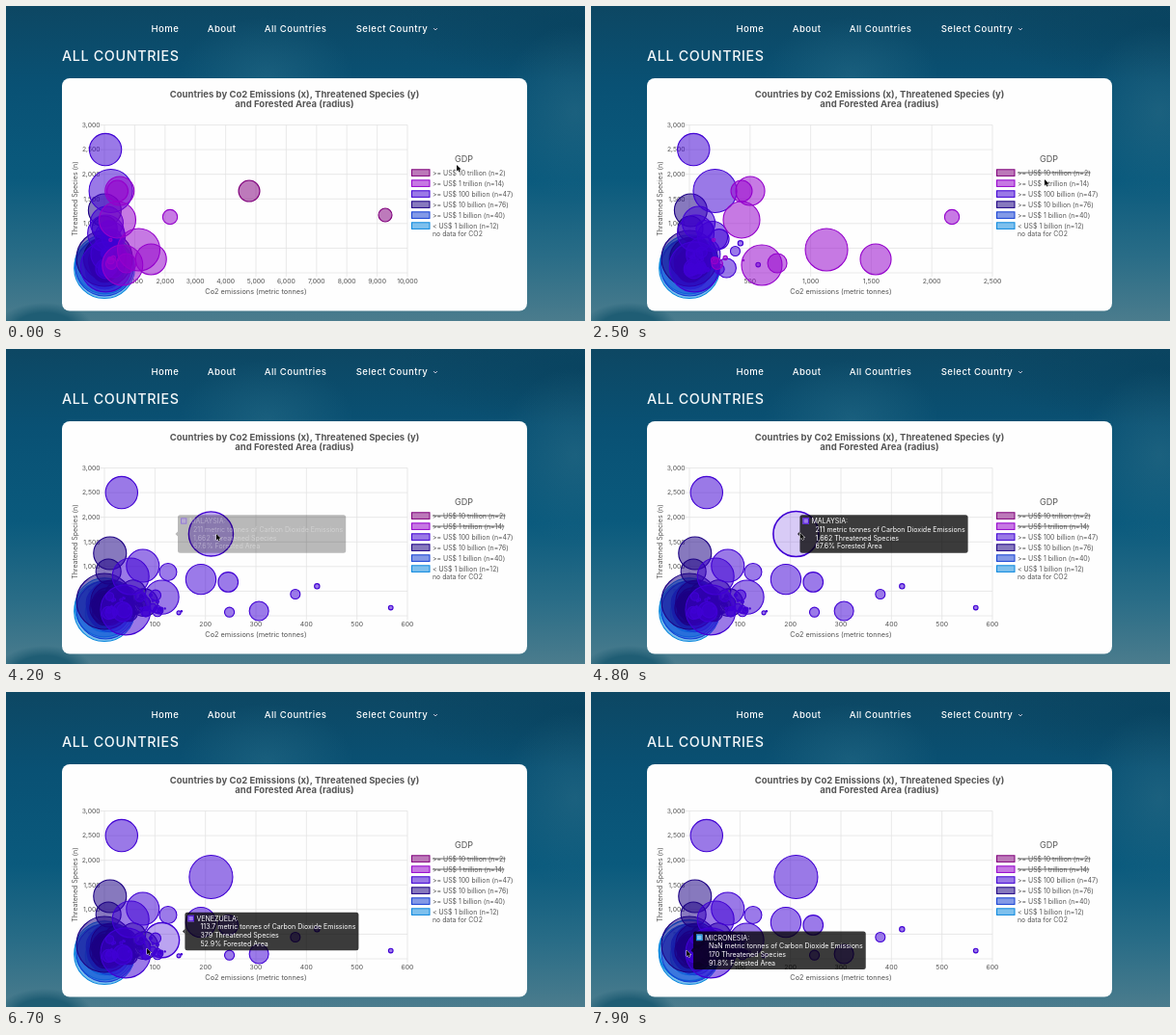
An HTML page with a canvas for the animation above (8000 ms loop, 600 px wide and 327 px high).

```html
<!DOCTYPE html>
<html lang="en">
<head>
<meta charset="utf-8">
<title>All countries</title>
<style>
  html, body { margin: 0; width: 100%; height: 100%; overflow: hidden; }
  body {
    background:
      radial-gradient(ellipse 50px 26px at 40px 334px, #1f5d74 60%, #1f5d7400),
      radial-gradient(ellipse 90px 60px at 270px 72px, #2a6f8a77, #2a6f8a00),
      radial-gradient(ellipse 80px 90px at 590px 110px, #2f6f8777, #2f6f8700),
      radial-gradient(ellipse 200px 60px at 600px 20px, #07405c99, #07405c00),
      linear-gradient(#0d4763, #095174 25%, #0a5a7d 55%, #2a6d87 80%, #4b7c8d);
  }
  canvas { display: block; }
</style>
</head>
<body>
<canvas id="stage" width="600" height="327"></canvas>
<script>
const ctx = document.getElementById('stage').getContext('2d');
const LOOP = 8000, LEFT = 102, RIGHT = 416, TOP = 123.5, BOTTOM = 277;
const CLICKS = [1600, 2900];
const SCALES = [{ max: 10000, step: 1000 }, { max: 2500, step: 500 }, { max: 600, step: 100 }];

const clamp = v => Math.max(0, Math.min(1, v));
const mix = (a, b, k) => a + (b - a) * k;
const easeOut = k => 1 - (1 - clamp(k)) ** 4;
const smooth = k => k * k * (3 - 2 * k);
const toX = (tonnes, max) => mix(LEFT, RIGHT, (tonnes || 0) / max);
const toY = species => mix(BOTTOM, TOP, species / 3000);

let seed = 11;
const rand = () => (seed = seed * 16807 % 2147483647) / 2147483647;
// Countries are [tonnes of CO2, threatened species, forest %]; most lie near the low end
const spread = (n, [x0, x1], [y0, y1], forest) => Array.from({ length: n }, () => [
  mix(x0, x1, rand() ** 2), mix(y0, y1, rand() ** 2), 2 + forest * rand() ** 3
]);

const groups = [
  { label: '>= US$ 10 trillion (n=2)', rgb: '128,0,124', dots: [[4777, 1660, 33], [9268, 1172, 21]] },
  { label: '>= US$ 1 trillion (n=14)', rgb: '148,0,204', dots: [
    [1131, 470, 66], [597, 156, 63], [430, 1075, 57], [1537, 275, 48], [502, 1660, 45],
    [430, 1660, 33], [725, 195, 30], [2166, 1133, 23],
    ...spread(6, [200, 560], [150, 850], 42)] },
  { label: '>= US$ 100 billion (n=47)', rgb: '64,0,212', dots: [
    [211, 1662, 67.6], [191, 740, 47], [113.7, 379, 52.9], [42, 120, 78], [52, 800, 57],
    [34, 2500, 50], [76, 1015, 51], [245, 685, 31], [306, 98, 30], [126, 890, 27],
    [378, 440, 15], [421, 600, 8], [567, 165, 7],
    ...spread(8, [105, 260], [60, 200], 18), ...spread(26, [8, 105], [60, 420], 32)] },
  { label: '>= US$ 10 billion (n=76)', rgb: '28,0,132', dots: [
    [0, 293, 87], [15, 293, 66], [11, 1270, 51], [8, 900, 39],
    ...spread(72, [0, 80], [60, 500], 50)] },
  { label: '>= US$ 1 billion (n=40)', rgb: '20,64,212', dots: [
    [2, 117, 90], ...spread(39, [0, 25], [60, 350], 72)] },
  { label: '< US$ 1 billion (n=12)', rgb: '10,136,222', dots: [
    [NaN, 170, 91.8], [NaN, 95, 94], ...spread(10, [0, 2], [60, 200], 70)] }
];

const tips = [
  { at: 4130, name: 'MALAYSIA', group: 2, dot: 0 },
  { at: 5710, name: 'VIETNAM', group: 2, dot: 1 },
  { at: 6636, name: 'VENEZUELA', group: 2, dot: 2 },
  { at: 7300, name: 'MICRONESIA', group: 5, dot: 0 }
];
const tipDot = tip => groups[tip.group].dots[tip.dot];

// Pointer stops: time, x, y
const path = [
  [0, 467, 165], [1600, 469, 174], [2500, 470, 180], [3200, 470, 182], [4150, 218, 192],
  [5300, 216, 190], [5700, 205.5, 223], [6700, 146, 266], [7300, 99, 268], [LOOP, 99, 268]
];

function text(str, x, y, size, { color = '#555', weight = 400, align = 'left', gap = 0 } = {}) {
  ctx.font = `${weight} ${size}px Inter, "Open Sans", sans-serif`;
  ctx.letterSpacing = gap + 'px';
  ctx.textAlign = align;
  ctx.fillStyle = color;
  ctx.fillText(str, x, y);
  return ctx.measureText(str).width;
}

function line(x1, y1, x2, y2, color, width = 0.8) {
  ctx.strokeStyle = color;
  ctx.lineWidth = width;
  ctx.beginPath();
  ctx.moveTo(x1, y1);
  ctx.lineTo(x2, y2);
  ctx.stroke();
}

function panel(x, y, w, h, r, color) {
  ctx.fillStyle = color;
  ctx.beginPath();
  ctx.roundRect(x, y, w, h, r);
  ctx.fill();
}

function swatch(x, y, w, h, rgb) {
  ctx.fillStyle = `rgba(${rgb},.52)`;
  ctx.strokeStyle = `rgb(${rgb})`;
  ctx.lineWidth = 1;
  ctx.fillRect(x, y, w, h);
  ctx.strokeRect(x, y, w, h);
}

function drawPage() {
  const nav = { color: '#fff', weight: 500, gap: 0.45 };
  text('Home', 150.5, 27.3, 9.6, nav);
  text('About', 208.7, 27.3, 9.6, nav);
  text('All Countries', 267.7, 27.3, 9.6, nav);
  text('Select Country', 362.7, 27.3, 9.6, nav);
  line(443, 23, 445, 25, '#dde');
  line(445, 25, 447, 23, '#dde');
  text('ALL COUNTRIES', 58, 57, 14.3, { color: '#f4f8fa', weight: 500, gap: 0.65 });
  panel(58, 75, 482, 241.5, 8, '#fefefe');
  const bold = { weight: 700, align: 'center' };
  text('Countries by Co2 Emissions (x), Threatened Species (y)', 299, 95, 9.5, bold);
  text('and Forested Area (radius)', 299, 105.3, 9.5, bold);
}

function drawAxes({ max, step }) {
  const grid = '#e4e4e4', mid = { align: 'center' };
  for (let v = 0; v <= max; v += step) {
    const x = toX(v, max);
    line(x, TOP, x, BOTTOM + 4, grid);
    text(v.toLocaleString('en-US'), x, 287.5, 6.8, mid);
  }
  for (let v = 0; v <= 3000; v += 500) {
    const y = toY(v);
    line(LEFT - 4, y, RIGHT, y, grid);
    text(v.toLocaleString('en-US'), 97.5, y + 2.3, 6.8, { align: 'right' });
  }
  text('Co2 emissions (metric tonnes)', 259, 298.5, 7.3, mid);
  ctx.save();
  ctx.translate(74, 200);
  ctx.rotate(-Math.PI / 2);
  text('Threatened Species (n)', 0, 0, 7, mid);
  ctx.restore();
}

function drawLegend(t) {
  text('GDP', 474.5, 162, 9, { align: 'center' });
  groups.forEach(({ label, rgb }, i) => {
    const y = 173 + 11 * i;
    swatch(420.5, y - 3.2, 18.5, 6.6, rgb);
    const width = text(label, 442, y + 2.5, 6.9);
    if (t >= CLICKS[i]) line(442, y, 442 + width, y, '#555', 0.9);
  });
  text('no data for CO2', 442, 239, 6.9);
}

function drawBubbles(t, stage, tip) {
  const moved = stage ? easeOut((t - CLICKS[stage - 1]) / 1000) : 1;
  const from = SCALES[Math.max(0, stage - 1)].max, to = SCALES[stage].max;
  ctx.save();
  ctx.beginPath();
  ctx.rect(59, 110, 359, 200);
  ctx.clip();
  for (const { rgb, dots } of [...groups].reverse()) {
    const click = CLICKS[groups.findIndex(g => g.dots === dots)];
    const shown = t >= click ? 1 - easeOut((t - click) / 1000) : 1;
    if (shown < 0.004) continue;
    ctx.strokeStyle = `rgba(${rgb},${shown})`;
    for (const dot of dots) {
      const [tonnes, species, forest] = dot;
      const hover = tip && tipDot(tip) === dot ? easeOut((t - tip.at) / 400) : 0;
      ctx.fillStyle = `rgba(${rgb},${shown * mix(0.52, 0.2, hover)})`;
      ctx.lineWidth = 1.1 + hover * 0.5;
      ctx.beginPath();
      ctx.arc(mix(toX(tonnes, from), toX(tonnes, to), moved), toY(species), forest / 3 + hover, 0, 7);
      ctx.fill();
      ctx.stroke();
    }
  }
  ctx.restore();
}

function drawTip(t, i) {
  const tip = tips[i], [tonnes, species, forest] = tipDot(tip);
  // The first tip starts where its bubble stood on the wider scale
  const [oldTonnes, oldSpecies] = tipDot(tips[i - 1] || tip);
  const oldMax = SCALES[i ? 2 : 1].max;
  const k = easeOut((t - tip.at) / 400);
  const x = mix(toX(oldTonnes, oldMax), toX(tonnes, SCALES[2].max), k) + 4;
  const y = mix(toY(oldSpecies), toY(species), k) - 19.7;
  const rows = [`${tonnes} metric tonnes of Carbon Dioxide Emissions`,
    `${species.toLocaleString('en-US')} Threatened Species`, `${forest}% Forested Area`];
  ctx.globalAlpha = i ? 1 : clamp((t - tip.at) / 200);
  ctx.font = '400 7.05px Inter, "Open Sans", sans-serif';
  ctx.letterSpacing = '0px';
  panel(x, y, 19 + ctx.measureText(rows[0]).width, 39.4, 2.5, 'rgba(0,0,0,.77)');
  ctx.beginPath();
  ctx.moveTo(x, y + 17.2);
  ctx.lineTo(x - 2.5, y + 19.7);
  ctx.lineTo(x, y + 22.2);
  ctx.fill();
  panel(x + 3, y + 3, 6.5, 6.5, 0, '#fff');
  swatch(x + 3.5, y + 3.5, 5.5, 5.5, groups[tip.group].rgb);
  text(tip.name + ':', x + 12, y + 8.9, 7.05, { color: '#fff' });
  rows.forEach((row, n) => text(row, x + 16, y + 17.6 + 8.7 * n, 7.05, { color: '#fff' }));
  ctx.globalAlpha = 1;
}

function drawCursor(t) {
  const n = path.findIndex(p => p[0] > t);
  const [t0, x0, y0] = path[n - 1], [t1, x1, y1] = path[n];
  const k = smooth((t - t0) / (t1 - t0));
  ctx.save();
  ctx.translate(mix(x0, x1, k), mix(y0, y1, k));
  const arrow = new Path2D('M0 0V6.4L1.5 5.1 2.5 7.4 3.6 6.9 2.6 4.7 4.6 4.6Z');
  ctx.strokeStyle = '#fff';
  ctx.lineWidth = 1;
  ctx.stroke(arrow);
  ctx.fillStyle = '#000';
  ctx.fill(arrow);
  ctx.restore();
}

function frame() {
  const t = performance.now() % LOOP;
  const stage = CLICKS.filter(c => t >= c).length;
  const active = tips.filter(tip => t >= tip.at).length - 1;
  ctx.clearRect(0, 0, 600, 327);
  drawPage();
  drawAxes(SCALES[stage]);
  drawBubbles(t, stage, tips[active]);
  drawLegend(t);
  if (active >= 0) drawTip(t, active);
  drawCursor(t);
  requestAnimationFrame(frame);
}
frame();
</script>
</body>
</html>
```
